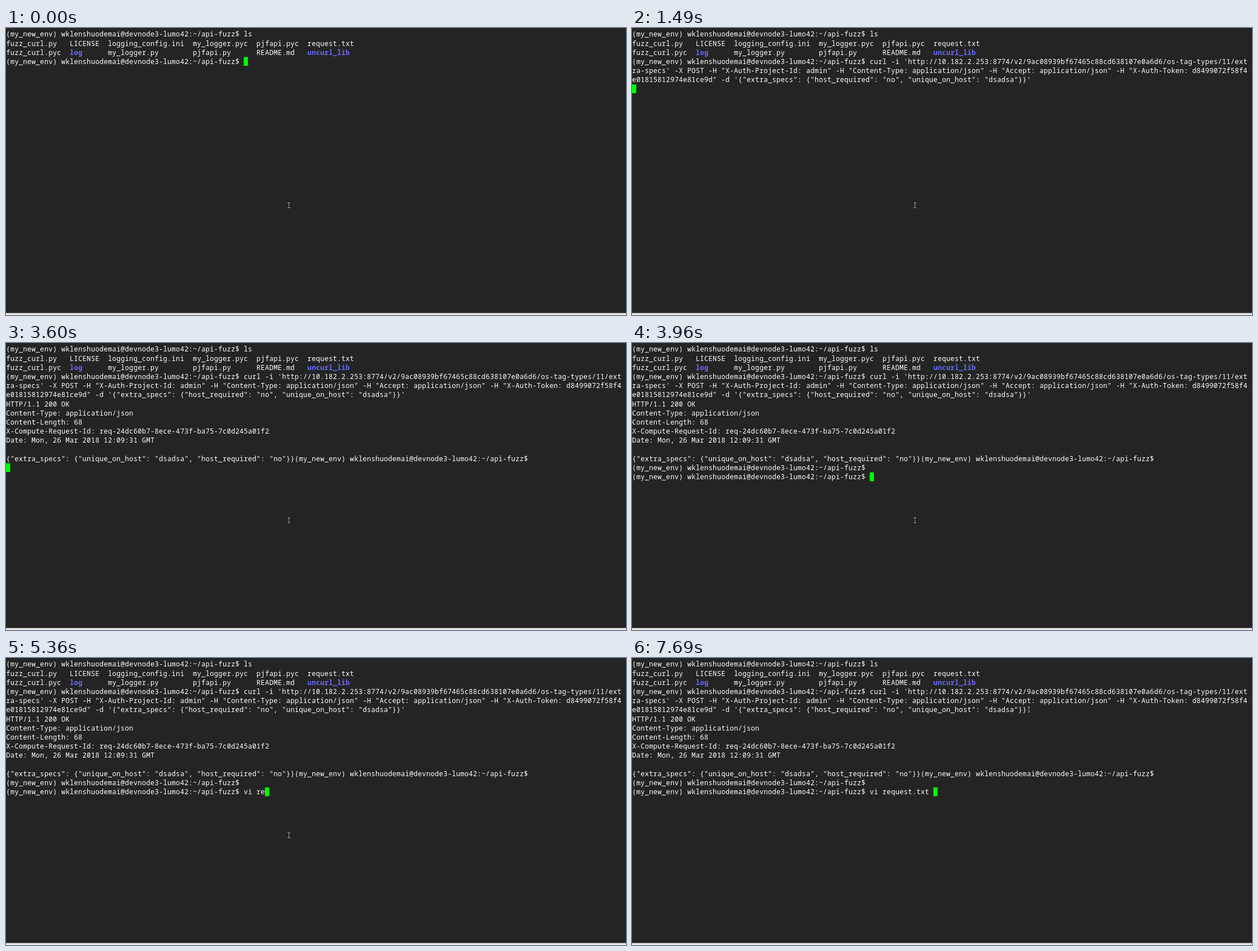
These frames come from a looping animation (1099 px wide and 510 px high, 8000 ms). An HTML page with a canvas:

```html
<!DOCTYPE html>
<html lang="en">
<head>
<meta charset="utf-8">
<title>Terminal session</title>
<style>
  html, body { margin: 0; width: 100%; height: 100%; overflow: hidden; background: #242424; }
  canvas { display: block; }
</style>
</head>
<body>
<canvas id="stage" width="1099" height="510"></canvas>
<script>
const ctx = document.getElementById('stage').getContext('2d');
const LOOP = 8000;
const COLUMNS = 145, CELL = 7.524, ROW = 16.21, TOP = 3, BASELINE = 12.3;
const FONT = '12px "Noto Sans Mono", "DejaVu Sans Mono", monospace';

const prompt = '(my_new_env) wklenshuodemai@devnode3-lumo42:~/api-fuzz$ ';
const curl = `curl -i 'http://10.182.2.253:8774/v2/9ac08939bf67465c88cd638107e0a6d6/os-tag-types/11/extra-specs' -X POST -H "X-Auth-Project-Id: admin" -H "Content-Type: application/json" -H "Accept: application/json" -H "X-Auth-Token: d8499072f58f4e01815812974e81ce9d" -d '{"extra_specs": {"host_required": "no", "unique_on_host": "dsadsa"}}'`;
const response = `HTTP/1.1 200 OK
Content-Type: application/json
Content-Length: 68
X-Compute-Request-Id: req-24dc60b7-8ece-473f-ba75-7c0d245a01f2
Date: Mon, 26 Mar 2018 12:09:31 GMT

{"extra_specs": {"unique_on_host": "dsadsa", "host_required": "no"}}`;

// A backtick switches the bold directory style on and off.
const listing = `fuzz_curl.py   LICENSE  logging_config.ini  my_logger.pyc  pjfapi.pyc  request.txt
fuzz_curl.pyc  \`log\`      my_logger.py        pjfapi.py      README.md   \`uncurl_lib\`
`;

// [time in ms, text appended to the terminal]
const output = [
  [0, prompt + 'ls\n' + listing + prompt],
  [500, curl.slice(0, 234)],
  [620, curl.slice(234)],
  [1490, '\n'],
  [1610, response],
  [1730, prompt],
  [3600, '\n'],
  [3720, prompt],
  [3840, '\n'],
  [3960, prompt],
  [4740, 'vi'],
  [4990, ' '],
  [5240, 'r'],
  [5360, 'e'],
  [5860, 'quest.txt '],
];

// [time in ms, x, y]; no position means the pointer is hidden.
const pointerStops = [
  [0, 501.5, 315], [6480, 514, 132], [6600],
  [6850, 507, 116], [6970, 535, 98], [7090, 575, 82], [7210, 620, 72],
  [7330, 668, 75], [7450, 707, 84], [7570], [7690, 703.5, 91.5],
];

function drawTerminal(text) {
  let row = 0, col = 0, bold = false;
  const wrap = () => { if (col === COLUMNS) { row++; col = 0; } };
  for (const char of text) {
    if (char === '`') { bold = !bold; continue; }
    if (char === '\n') { row++; col = 0; continue; }
    wrap();
    if (char !== ' ') {
      ctx.font = bold ? `bold ${FONT}` : FONT;
      ctx.fillStyle = bold ? '#6c6cff' : '#fff';
      ctx.fillText(char, (col + 0.5) * CELL, TOP + row * ROW + BASELINE);
    }
    col++;
  }
  wrap();
  ctx.fillStyle = '#0f0';
  ctx.fillRect(col * CELL, TOP + row * ROW, CELL, 15.6);
}

function drawPointer(x, y) {
  const beam = new Path2D(`M${x - 2.5} ${y - 4.5}h5M${x - 2.5} ${y + 4.5}h5M${x} ${y - 4.5}v9`);
  for (const [color, width] of [['#1e1e1e', 3], ['#a4a4a4', 1]]) {
    ctx.strokeStyle = color;
    ctx.lineWidth = width;
    ctx.stroke(beam);
  }
}

function draw(now) {
  const time = now % LOOP;
  const reached = ([at]) => at <= time;
  ctx.fillStyle = '#242424';
  ctx.fillRect(0, 0, 1099, 510);
  ctx.fillStyle = '#ebe9e7';
  ctx.fillRect(0, 506.5, 1099, 3.5);
  drawTerminal(output.filter(reached).map(([, text]) => text).join(''));
  const [, x, y] = pointerStops.filter(reached).pop();
  if (x !== undefined) drawPointer(x, y);
  requestAnimationFrame(draw);
}

ctx.textAlign = 'center';
requestAnimationFrame(draw);
</script>
</body>
</html>
```
